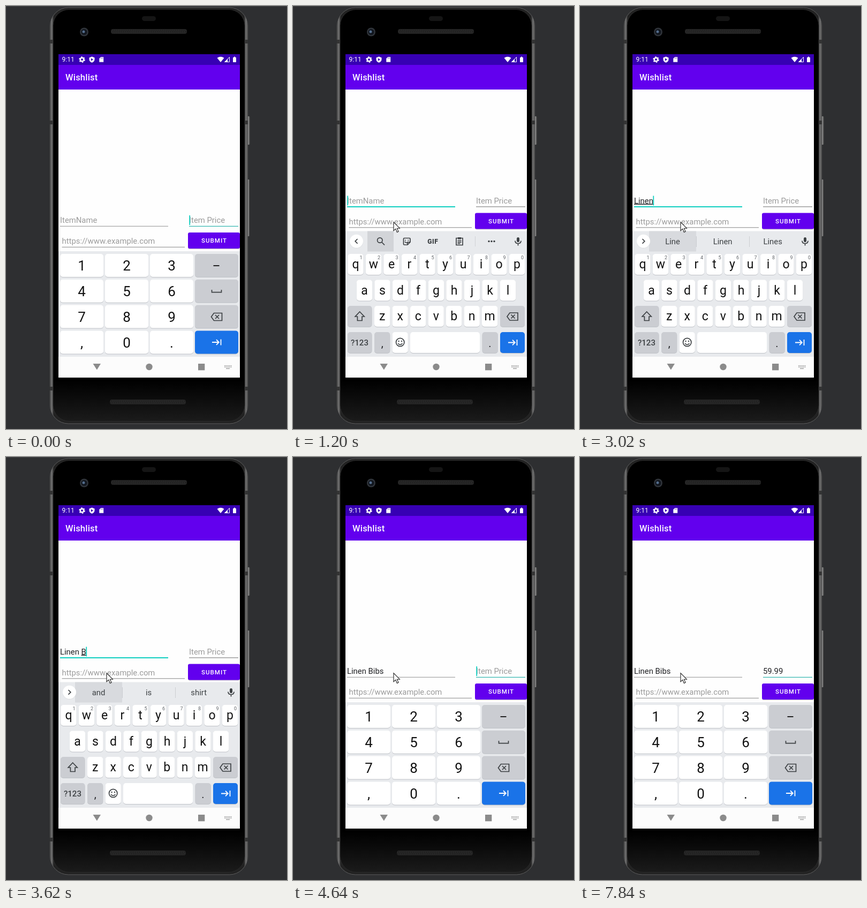
Write an HTML page that moves like this. It is 525 by 790 pixels and loops after 8000 ms.

```html
<!DOCTYPE html>
<html lang="en">
<head>
<meta charset="utf-8">
<title>Wishlist app</title>
<style>
html, body { margin: 0; width: 100%; height: 100%; overflow: hidden; background: #2e2f31; }
svg { display: block; width: 525px; height: 790px; font-family: Roboto, "Noto Sans", sans-serif; }
text { white-space: pre; }
.mid { text-anchor: middle; }
.field { font-size: 14.85px; }
.under { text-decoration: underline; text-decoration-thickness: 1px; text-decoration-skip-ink: none; }
.icon { fill: none; stroke: #3c4043; stroke-width: 1.7; }
</style>
</head>
<body>
<svg id="stage" viewBox="0 0 525 790"></svg>
<script>
const LOOP = 8000;
const ITEM = 'Linen Bibs', PRICE = '59.99';
const ITEM_KEYS = [2220, 2420, 2620, 2820, 3020, 3420, 3620, 3820, 4020, 4240];
const PRICE_KEYS = [6240, 6440, 6840, 7040, 7240];
const SUGGESTIONS = [
  [2420, 'L', 'Let', 'Look'], [2620, 'Li', 'Like', 'Line'], [2820, 'Lin', 'Line', 'Link'],
  [3020, 'Line', 'Linen', 'Lines'], [3220, 'Linen', 'Linens', 'Lines'], [3420, 'and', 'is', 'shirt'],
  [3820, 'B', 'Bag', 'But'], [4020, 'Bib', 'Bibs', 'Big'], [4240, 'Bibs', 'Blobs', 'Ribs']
];
const TEAL = '#0fcfc0', HINT = '#9b9b9b', INK = '#202124';

const rect = (x, y, w, h, fill, rx = 0, more = '') =>
  `<rect x="${x}" y="${y}" width="${w}" height="${h}" rx="${rx}" fill="${fill}" ${more}/>`;
const text = (x, y, size, str, fill = '#111', more = '') =>
  `<text x="${x}" y="${y}" font-size="${size}" fill="${fill}" ${more}>${str}</text>`;
const label = (x, y, size, str, fill, more = '') => text(x, y, size, str, fill, `class="mid" ${more}`);
const path = (d, more = 'class="icon"') => `<path d="${d}" ${more}/>`;
const circle = (x, y, r, more) => `<circle cx="${x}" cy="${y}" r="${r}" ${more}/>`;
const at = (x, y, body) => `<g transform="translate(${x} ${y})">${body}</g>`;
const key = (x, y, w, h, fill = '#fff') => rect(x, y + 1, w, h, '#bfc2c7', 5) + rect(x, y, w, h, fill, 5);

const GREY_KEY = '#cbcdd2', BLUE = '#1a73e8';
const backspace = (x, y) => at(x, y, path('M-10 0L-5-7H10V7H-5ZM-2.5-3.5l7 7m0-7l-7 7'));
const tabIcon = (x, y) => at(x, y, path('M-8.5 0H4M-.5-4.8L4.3 0l-4.8 4.8M8-5.5V5.5', 'fill="none" stroke="#fff" stroke-width="1.8"'));

function phone() {
  const grille = y => rect(196, y, 142, 9, '#242424', 4) + rect(198, y + 1.5, 138, 6, 'url(#mesh)', 3);
  const band = y => rect(82, y, 5, 7, '#343434') + rect(447, y, 5, 7, '#343434');
  return `<defs>
    <pattern id="mesh" width="4" height="6" patternUnits="userSpaceOnUse">
      <rect width="4" height="6" fill="#0c0c0c"/><path d="M0 0l2 3-2 3M2 0l2 3-2 3" fill="none" stroke="#444" stroke-width=".9"/>
    </pattern>
    <linearGradient id="rim"><stop stop-color="#3a3a3a"/><stop offset=".008" stop-color="#777"/>
      <stop offset=".018" stop-color="#222"/><stop offset=".982" stop-color="#222"/>
      <stop offset=".992" stop-color="#777"/><stop offset="1" stop-color="#3a3a3a"/></linearGradient>
    <linearGradient id="chin" x2="0" y2="1"><stop stop-color="#000"/><stop offset=".9" stop-color="#000"/>
      <stop offset="1" stop-color="#1b1b1b"/></linearGradient>
    <linearGradient id="knob"><stop stop-color="#555"/><stop offset=".5" stop-color="#8a8a8a"/><stop offset="1" stop-color="#333"/></linearGradient>
  </defs>` +
  rect(0, 0, 525, 790, '#2e2f31') + rect(0, 0, 525, 1, '#414244') +
  rect(450, 206, 6, 53, 'url(#knob)', 2) + rect(450, 324, 5.5, 106, 'url(#knob)', 2) +
  rect(82.5, 3, 369, 777, 'url(#rim)', 34, 'stroke="#5c5c5c"') +
  band(63) + band(214) + band(711) +
  rect(88, 6.5, 358, 769, 'url(#chin)', 30, 'stroke="#2b2b2b"') +
  rect(254, 19, 26, 9, '#151515', 4.5) + grille(43) + at(-2, 0, grille(735)) +
  circle(146, 48.5, 8, 'fill="#30343a"') + circle(146, 48.5, 5.5, 'fill="#11161e"') +
  circle(145, 48, 2.5, 'fill="#536c8c"');
}

function screen() {
  const white = 'fill="#fff"';
  const gear = circle(142, 100, 3.2, 'fill="none" stroke="#fff" stroke-width="2.6"') +
    circle(142, 100, 4.9, 'fill="none" stroke="#fff" stroke-width="1.8" stroke-dasharray="2.6 2.53"');
  return rect(98, 90, 339, 604, '#fefefe') + rect(98, 90, 339, 20, '#3700b3') + rect(98, 110, 339, 46, '#6200ee') +
    text(104.5, 104, 12, '9:11', '#fff') + gear +
    path('M160.5 94.5l5 2v3.3q0 4-5 6-5-2-5-6v-3.3z', white) + path('M159 97.6l4 2.4-4 2.4z', 'fill="#3700b3"') +
    path('M177 95h5.5v10h-8.5v-7zM177 96.5v2m1.8-2v2m1.8-2v2', 'fill="#fff" stroke="#3700b3" stroke-width=".6"') +
    path('M394.5 97q6.5-4.6 13 0l-6.5 8z', white) +
    path('M408.5 104.5h9v-9z', 'fill="none" stroke="#fff"') + path('M408 105l6-6v6z', white) +
    rect(424, 96, 6, 9, '#fff', .8) + rect(425.7, 94.7, 2.6, 2, '#fff') +
    text(111, 139, 16.5, 'Wishlist', '#fff', 'font-weight="500" letter-spacing=".2"');
}

function navBar() {
  const grey = 'fill="#8b8b8b"';
  let dots = '';
  for (let r = 0; r < 2; r++) for (let c = 0; c < 6; c++) dots += rect(408 + c * 2.4, 671 + r * 2.6, 1.4, 1.4, '#8b8b8b');
  return rect(98, 655, 339, 39, '#fcfcfc') + path('M162.5 668h14.5l-7.2 11.5z', grey) +
    circle(267.5, 674, 6.2, grey) + rect(359, 668, 12.3, 12.3, '#8b8b8b') + dots + rect(411, 676.5, 7, 1.2, '#8b8b8b');
}

function numberPad() {
  const rows = ['123', '456', '789', ',0.'];
  let out = rect(98, 458, 339, 197, '#e8eaed');
  rows.forEach((row, r) => {
    const y = 463 + r * 47.8;
    [...row].forEach((c, i) => {
      out += key(101 + i * 84, y, 81, 43) + label(141.5 + i * 84, y + 31.2, 26, c, '#111');
    });
    out += key(353, y, 81, 43, r === 3 ? BLUE : GREY_KEY);
  });
  return out + rect(387.5, 484, 11, 2, '#222') + path('M384.5 530v4.7h18V530') + backspace(393.5, 580.5) + tabIcon(393.5, 628);
}

function letterPad() {
  let out = rect(98, 420.5, 339, 234.5, '#e8eaed');
  const row = (letters, cx, y, digits = '') => [...letters].forEach((c, i) => {
    const x = cx + i * 33.5;
    out += key(x - 14.7, y, 29.3, 39) + label(x, y + 27.2, 23, c, '#111');
    if (digits) out += label(x + 10, y + 9.5, 9, digits[i], '#5f6368');
  });
  row('qwertyuiop', 117, 463, '1234567890');
  row('asdfghjkl', 133.5, 511.5);
  row('zxcvbnm', 166.7, 560);
  const grey = (x, y, w) => key(x, y, w, 39, GREY_KEY);
  return out + grey(102, 560, 45.5) + grey(387, 560, 46) + grey(102, 609, 45.5) + grey(152, 609, 29.3) +
    key(185.5, 609, 29.3, 39) + key(219, 609, 130, 39) + grey(353.5, 609, 29.3) + key(387, 609, 46, 39, BLUE) +
    path('M124.7 571l8.5 9h-4.2v7.5h-8.6V580h-4.2z') + backspace(410, 580) + tabIcon(410.5, 628.5) +
    label(124.5, 633.5, 15, '?123', '#3c4043', 'font-weight="500"') +
    label(166.7, 637, 20, ',', INK) + label(368, 637, 20, '.', INK) +
    circle(200.2, 628, 7.7, 'class="icon"') + circle(197.5, 626, 1.2, 'fill="#3c4043"') +
    circle(203, 626, 1.2, 'fill="#3c4043"') + path('M196 630q4.2 5 8.4 0');
}

const mic = rect(418, 432, 5, 9, '#3c4043', 2.5) + path('M415 438.5q0 5 5.5 5t5.5-5M420.5 443.5v4');
const bubble = d => circle(118.5, 440, 12.5, 'fill="#cfd1d5"') + circle(118.5, 439.3, 12.5, 'fill="#fff"') + path(d);

const toolbar = rect(139, 420.5, 49, 38, '#d2d4d8') + bubble('M120.5 435l-4.3 4.3 4.3 4.3') +
  circle(162.3, 437.5, 4.7, 'class="icon"') + path('M165.7 441l5.3 5.3') +
  path('M208 433.5h9.5q1.5 0 1.5 1.5v6l-5 5h-6q-1.5 0-1.5-1.5V435q0-1.5 1.5-1.5zM214 446v-4.8h5M209 440q2 3 4.5 2') +
  circle(210, 437.5, 1, 'fill="#3c4043"') + circle(215.3, 437.5, 1, 'fill="#3c4043"') +
  label(261.3, 443.7, 12, 'GIF', '#3c4043', 'font-weight="900" letter-spacing=".5"') +
  path('M305 433.5h12v13h-12zM307.5 438h7m-7 2.8h7m-7 2.8h5') + rect(308, 432, 6, 3.5, '#3c4043') +
  rect(340, 430, 1, 19, '#d0d2d6') + [366, 371, 376].map(x => circle(x, 439.5, 1.7, 'fill="#3c4043"')).join('') + mic;

const candidates = words => rect(129, 420.5, 88, 38, '#d8dade') + bubble('M116.5 435l4.3 4.3-4.3 4.3') +
  words.map((w, i) => label(173 + i * 93.6, 445, 14.85, w, '#3c4043')).join('') +
  rect(217, 430, 1, 20, '#cbcdd1') + rect(316, 430, 1, 20, '#cbcdd1') + mic;

const stage = document.getElementById('stage');
stage.innerHTML = phone() + screen() +
  `<g id="form">
    <text id="item" class="field" x="101" y="405"></text><text id="price" class="field" x="342" y="405"></text>` +
    text(104.5, 444.3, 14.85, 'https://www.example.com', HINT) +
    `<rect id="itemLine" x="101" width="202"/><rect id="priceLine" x="342" y="410.8" width="92" height="1.2"/>` +
    rect(104.5, 449.8, 229.5, 1, '#858585') +
    rect(340, 424, 97, 30, '#c9c9c9', 3.3) + rect(340, 423, 97, 30, '#6200ee', 3.3) +
    label(389, 442.2, 11.55, 'SUBMIT', '#fff', 'font-weight="500" letter-spacing="1.03"') +
    `<rect id="caret" y="391" width="1.8" height="18" fill="${TEAL}"/>
  </g>
  <g id="numbers">${numberPad()}</g>
  <g id="letters">${letterPad()}<g id="strip"></g></g>` + navBar() +
  circle(187, 399, 12, 'id="press" fill="#fff35c" opacity=".82"') +
  `<g id="pointer">${path('M0 0v16.2l3.7-3.5 2.7 6.2 2.7-1.2-2.7-6h5z', 'fill="#fff" stroke="#222" stroke-width="1.1"')}</g>`;

const el = id => document.getElementById(id);
const show = (id, on) => el(id).setAttribute('display', on ? 'inline' : 'none');
const set = (id, attrs) => Object.entries(attrs).forEach(([k, v]) => el(id).setAttribute(k, v));
const within = (t, a, b) => t >= a && t < b;
const typed = (str, times, t) => str.slice(0, times.filter(k => t >= k).length);

// Only redraw text or markup when it really differs.
function fill(id, html) {
  const node = el(id);
  if (node.shown !== html) node.innerHTML = node.shown = html;
}

function render(t) {
  const lettersUp = within(t, 1200, 4640);
  const pressed = within(t, 1000, 1200);
  const item = typed(ITEM, ITEM_KEYS, t), price = typed(PRICE, PRICE_KEYS, t);
  const cut = item.lastIndexOf(' ') + 1;

  fill('item', !item ? 'ItemName' : lettersUp ?
    item.slice(0, cut) + `<tspan class="under">${item.slice(cut)}</tspan>` : item);
  fill('price', price || 'Item Price');
  set('item', { fill: item ? INK : pressed ? '#686868' : HINT });
  set('price', { fill: price ? INK : HINT });

  const focused = lettersUp || pressed;
  set('itemLine', { y: lettersUp ? 410.5 : 410.8, height: lettersUp ? 2 : pressed ? 1.5 : 1, fill: focused ? TEAL : '#929292' });
  set('priceLine', { fill: lettersUp ? '#858585' : '#2fb5ad' });
  set('form', { transform: `translate(0 ${lettersUp ? -36.5 : 0})` });

  const caretOff = within(t, 400, 800) || within(t, 1600, 2220) || within(t, 5240, 5640) || t >= 7840;
  const [field, value, left] = lettersUp ? ['item', item, 101] : ['price', price, 342];
  set('caret', { x: left + (value ? el(field).getComputedTextLength() - .5 : .3) });
  show('caret', !caretOff);

  show('numbers', !lettersUp);
  show('letters', lettersUp);
  const words = SUGGESTIONS.filter(s => t >= s[0]).pop();
  fill('strip', words ? candidates(words.slice(1)) : toolbar);

  const glide = Math.min(1, Math.max(0, (t - 600) / 200));
  const ease = 1 - (1 - glide) ** 2;
  set('pointer', { transform: `translate(${188 + 30 * (1 - ease)} ${(t < 1200 ? 398.5 : 403.5) + 30 * (1 - ease)})` });
  show('pointer', t >= 600);
  show('press', pressed);
}

const start = performance.now();
function tick() {
  render((performance.now() - start) % LOOP);
  requestAnimationFrame(tick);
}
tick();
</script>
</body>
</html>
```
